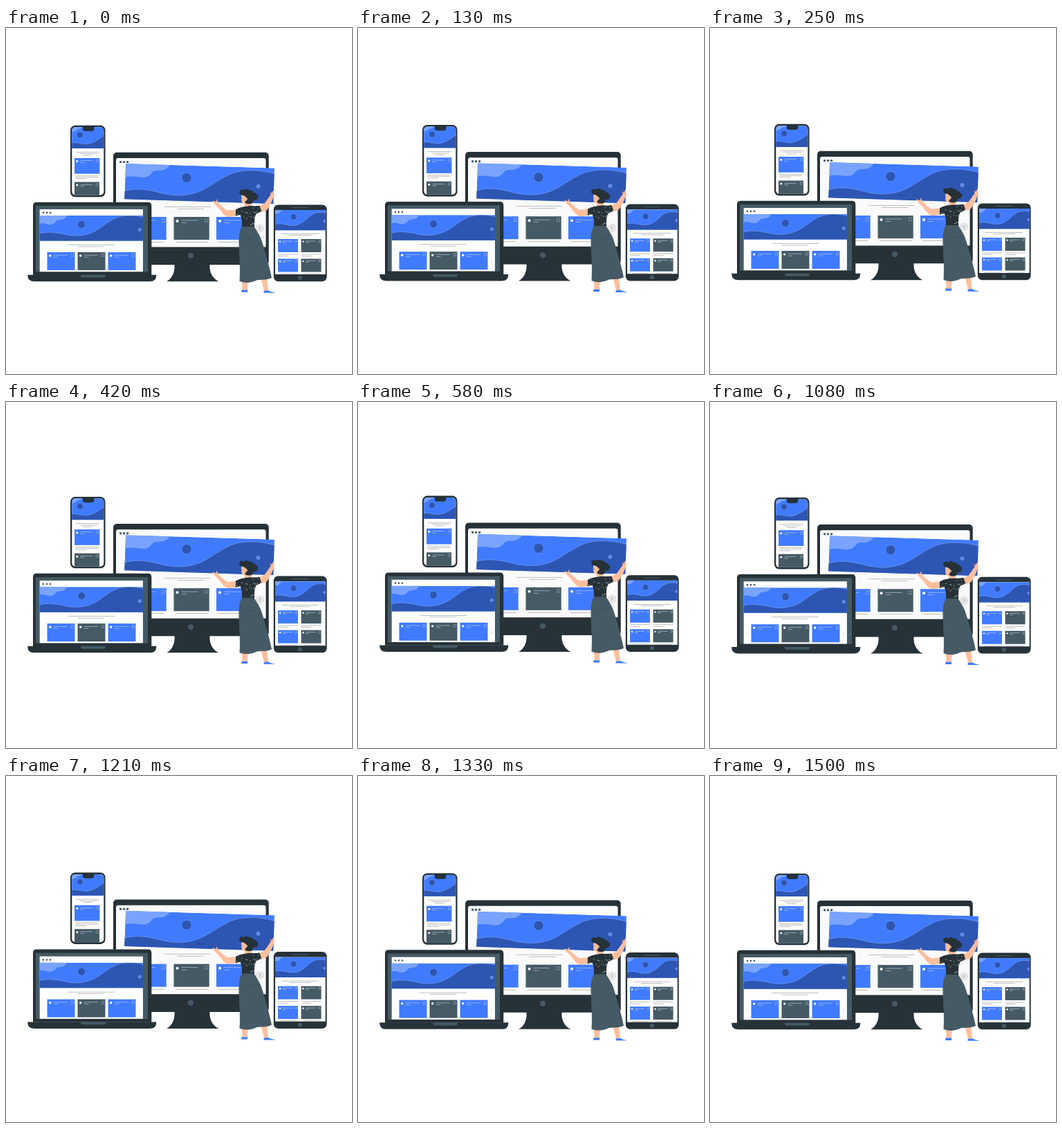
An HTML page that plays this animation: 500x500 px, repeating every 1.54 s.

```html
<!DOCTYPE html>
<html lang="en">
<head>
<meta charset="utf-8">
<title>Responsive design</title>
<style>
  html, body { margin: 0; width: 100%; height: 100%; overflow: hidden; background: #fff; }
  svg { display: block; width: 100vw; height: 100vh; }
</style>
</head>
<body>
<svg id="stage" viewBox="0 0 500 500"><g id="scene"></g></svg>
<script>
const LOOP = 1540, PEAK = 700, LIFT = 5.6;
const DARK = '#263238', GREY = '#455a64', BLUE = '#407bff', NAVY = '#2d56b3',
      SKY = '#79a3ff', SKIN = '#ffbe9d', PALE = '#9db8f5', LINE = '#a3a3a3';

const rect = (x, y, w, h, fill, r = 0) =>
  `<rect x="${x}" y="${y}" width="${w}" height="${h}" rx="${r}" fill="${fill}"/>`;
const dot = (x, y, r, fill, more = '') =>
  `<circle cx="${x}" cy="${y}" r="${r}" fill="${fill}" ${more}/>`;
const path = (d, fill, more = '') => `<path d="${d}" fill="${fill}" ${more}/>`;
const stroke = (d, color, w) =>
  path(d, 'none', `stroke="${color}" stroke-width="${w}" stroke-linecap="round" stroke-linejoin="round"`);
const rule = (x1, x2, y, color = LINE, w = 0.7) => rect(x1, y - w / 2, x2 - x1, w, color);
const clip = (id, shape, content) =>
  `<clipPath id="${id}">${shape}</clipPath><g clip-path="url(#${id})">${content}</g>`;
const menu = (x, y, step, r) => [0, 1, 2].map(i => dot(x + i * step, y, r, GREY)).join('');

// Content card; s scales the small details.
function card(x, y, w, h, fill, s = 1) {
  const bx = x + w - 5.8 * s, by = y + 3 * s;
  return rect(x, y, w, h, fill) +
    dot(x + 5 * s, y + 6 * s, 2 * s, '#fff') +
    rule(x + 11 * s, x + 35 * s, y + 5 * s, '#c5d0e2', 0.6) +
    rule(x + 11 * s, x + 19 * s, y + 8.4 * s, '#c5d0e2', 0.6) +
    stroke(`M${bx} ${by}h${3.4 * s}v${5 * s}l${-1.7 * s} ${-1.6 * s}l${-1.7 * s} ${1.6 * s}z`, '#c5d0e2', 0.4);
}

const wave = d => path(d, NAVY, `stroke="${PALE}" stroke-width=".4"`);
const blob = d => path(d, SKY, `stroke="${PALE}" stroke-width=".4"`);
const sun = (x, y, r) => dot(x, y, r, NAVY, `stroke="${PALE}" stroke-width=".3"`);
const ring = (x, y, r) => dot(x, y, r, '#4a7ff0', `stroke="${PALE}" stroke-width=".7"`);

function monitor() {
  const banner = 'M173 196L388 202.5L386.3 254L171.2 247.2Z';
  return path('M243.5 341C244.5 353 240 362 232 366.2H307.5C298.5 362 293.5 353 294.5 341Z', DARK) +
    rect(155, 179.8, 224.7, 162.4, DARK, 5) +
    path('M159 316.5V191Q159 188 162 188H372.500Q375.500 188 375.500 191V316.500Z', '#fafafa') +
    dot(267, 329, 4, GREY) +
    menu(165.6, 193.6, 5, 1.7) +
    rule(229, 295.500, 258.5) + rule(247, 286, 261.5) +
    card(180.5, 273, 51.2, 33, BLUE) +
    card(242.5, 273, 51.2, 33, GREY) +
    card(304, 273, 51.2, 33, BLUE) +
    rule(190, 228, 309.5) + rule(245, 292, 309.5) + rule(307, 353, 309.5) +
    dot(367, 289.5, 5.600, '#e8e8e8', 'stroke="#c8c8c8" stroke-width=".5"') +
    stroke('M366 287.500l2 2l-2 2', '#777', 0.7) +
    clip('board', path(banner, '#000'),
      path(banner, BLUE) +
      wave('M165 238C184 230 203 233 222 238C245 244 268 244 290 231C311 219 322 208 345 206.300C362 205 376 207 392 212V260H165Z') +
      blob('M165 190H237.500C239 202 228 206 219 205.500C210 205 212 211 204 214.500C194 218 188 211 165 216Z') +
      sun(261, 216.500, 7) + ring(364.500, 229, 2.4) +
      [275, 279.3, 283.6].map(x => dot(x, 243.700, 0.8, '#1f3d80')).join(''));
}

function laptop() {
  return path('M39 357V257Q39 251.700 44.300 251.700H205Q210.300 251.700 210.300 257V357Z', DARK) +
    rect(43, 257, 162, 95.500, GREY) +
    rect(48.7, 262, 149.200, 90.2, '#fff') +
    menu(54, 266.9, 5, 1.3) +
    clip('lap', rect(48.7, 271, 149.200, 36.600, '#000'),
      rect(48, 271, 151, 37, BLUE) +
      wave('M46 298C58 293 75 296 88 299C103 302 119 300 133 291C145 283 154 274 169 271.800C182 270 193 272 200 274V310H46Z') +
      blob('M46 268H88C88 275 82 277 77 277C71 277 73 281 67 283C60 286 57 279 46 283Z') +
      sun(109, 284, 5.500) + ring(193.300, 291.500, 2)) +
    rule(89, 157, 313.500) + rule(104, 141, 316) +
    [[59.5, BLUE], [103.5, GREY], [147.5, BLUE]].map(([x, c]) => card(x, 324, 40, 26, c, 0.84)).join('') +
    stroke('M54.500 336l-1.500 2l1.500 2M192.500 336l1.500 2l-1.500 2', '#bbb', 0.6) +
    path('M31.300 356.700H217.200V358Q217 366.200 208 366.200H41Q31.500 366.200 31.300 358Z', DARK) +
    path('M108 356.700H144V357.500Q144 360.600 141 360.600H111Q108 360.600 108 357.500Z', GREY);
}

function phone() {
  const content = rect(95, 143, 47, 99, '#fff') +
    rect(95, 143, 47, 31, BLUE) +
    clip('tall', rect(95, 143, 47, 31, '#000'),
      wave('M92 167C101 163 108 169 118 167.500C128 166 135 160 144 154V176H92Z') +
      blob('M92 140H111C111 147 104 144 102 147C100 150 97 149 92 151Z') +
      sun(107, 154.5, 4.500)) +
    rule(100.5, 135.5, 179.500) + rule(106, 132, 181.800) + rule(111, 125, 184) +
    card(99, 188, 36.400, 22.700, BLUE, 0.75) +
    rule(100, 133.5, 213.300) + rule(100, 133.5, 215.500) + rule(100, 117, 217.700) +
    card(99, 222.5, 36, 23, GREY, 0.75);
  return rect(93, 140.800, 50.500, 103.400, DARK, 7) +
    clip('phone', rect(95.300, 143.200, 46, 98.400, '#000', 5), content) +
    path('M110 142H128Q127.200 143 127.200 146Q127 149 124 149H114Q111 149 111 146Q111 143 110 142Z', DARK);
}

function tablet() {
  const cols = [[393, BLUE], [426.500, GREY]];
  return rect(386.800, 255.400, 76.800, 110.800, DARK, 6.500) +
    stroke('M413.500 259.500H436.500', GREY, 1.100) +
    rect(389, 263, 72.600, 93, '#fff') +
    dot(425, 361, 3, GREY) +
    clip('tab', rect(389, 263, 72.600, 29.200, '#000'),
      rect(389, 263, 73, 30, BLUE) +
      wave('M386 285C396 280 405 285 413 285.500C426 286 433 277 440 271C448 265 456 266 464 268V294H386Z') +
      blob('M386 260H400C399 266 396 264 395 267C393 269 391 267 386 270Z') +
      sun(415.500, 273, 4.400) + ring(460.500, 279, 1.5)) +
    rule(398, 452, 297.500) + rule(409, 441, 299.700) +
    cols.map(([x, c]) =>
      card(x, 305, 29, 19, c, 0.6) + card(x, 333.500, 29, 19, c, 0.6) +
      rule(x, x + 29, 327) + rule(x, x + 15, 329.500) + rule(x + 3, x + 27, 355)).join('');
}

function woman() {
  let seed = 7;
  const rnd = () => (seed = seed * 16807 % 2147483647) / 2147483647;
  let specks = '';
  for (let i = 0; i < 34; i++) {
    specks += `M${332 + rnd() * 36} ${259 + rnd() * 27}l${rnd() * 4 - 2} ${rnd() * 2 - 1}`;
  }
  const top = 'M332 262C338 259 343 258 348 257.500C354 256.500 361 258 366.500 256.500L369.500 265L361.500 269C359 275 359 280 359 287H340.500C342 280 340 275 338.500 270L331.500 272Z';
  return path('M341 364H349.500L348.500 379H341.500ZM368.500 362L376.500 360L379 380H373Z', SKIN) +
    path('M341 378Q345 379.500 349 378V381.800H339.800ZM372.500 380Q376 379 379.500 379.500Q383 381.500 388 382V382.700H372.500Z', BLUE) +
    path('M341 286H358.500C361 292 366 297 369 306C374 321 380 342 384 361C376 365 369 363 362 364.500C354 368.500 346 369 337.500 366C339 344 336.500 329 336.500 306C336.500 298 338 292 341 286Z', GREY) +
    stroke('M347 306Q352 306 356 304', '#36474f', 0.7) +
    path('M332.500 262.500L320 263.500C315 261 310 256 306 252L305 247L303.500 251L298 249.500C300 254 304 257 307 260C311 265 315 271 320 273C325 273 329 272 333 271Z', SKIN) +
    path('M366.500 257L373.500 253.500C377 249 380 244 382.500 241L382 236L384 239L386.500 234Q389 240 386.800 244C384 251 381 258 377.500 262.500C375 264.500 372 265.500 368 266Z', SKIN) +
    path('M344 250L354 249L355 257.500Q350 261 345 258.500Z', SKIN) +
    path('M340.500 240C339.500 245 340 249 341 252C342.500 254.500 347 254 350 251L350 240Z', SKIN) +
    path('M338 240C335 234 341 232 344 234.500C347 231.500 351 233 352.500 235C355 234 358 236 357.500 238.500C360 237 362.500 239 361.500 241C365 240 365.500 245 363 246C363.500 249.500 359 250 358 247.500C358 250 357 253 354.500 254C350 255 346 254 345 251.500C349 249 348 244 345.500 243.500C344 241 341 242.500 338 240Z', DARK) +
    dot(347.300, 247, 1.600, SKIN) +
    stroke('M341.200 245.800v.8', DARK, 0.6) +
    clip('top', path(top, '#000'), path(top, DARK) + stroke(specks, '#d5dadd', 0.65));
}

const scene = document.getElementById('scene');
scene.innerHTML = monitor() + laptop() + phone() + tablet() + woman();

const start = performance.now();
function draw() {
  const t = (performance.now() - start) % LOOP;
  const lift = LIFT * (1 + Math.cos(2 * Math.PI * (t - PEAK) / LOOP)) / 2;
  scene.setAttribute('transform', `translate(0 ${(0.1 - lift).toFixed(3)})`);
  requestAnimationFrame(draw);
}
draw();
</script>
</body>
</html>
```
